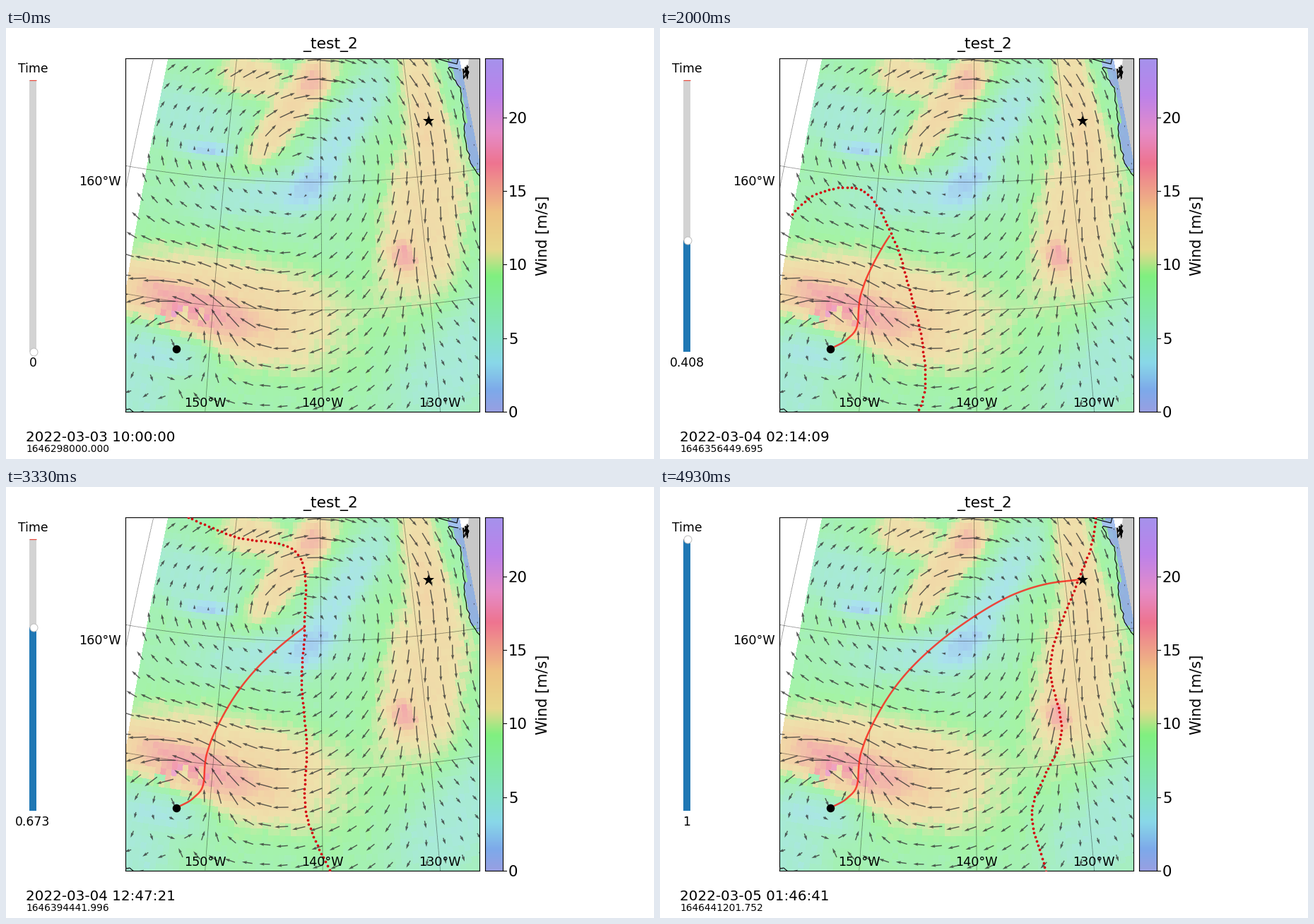
A matplotlib script that plays this animation: 917 px wide and 611 px high, repeating every 5.06 s.

```python
import numpy as np
import matplotlib.pyplot as plt
from matplotlib.animation import FuncAnimation
from matplotlib.colors import LinearSegmentedColormap

W, H, DPI = 917, 611, 64
PT = 72 / DPI  # points per pixel
LOOP_MS, TICK_MS, STEPS = 5060, 20, 49
plt.rcParams["font.family"] = "DejaVu Sans"
rng = np.random.default_rng(4)

MAP = (169, 43, 670, 544)
BAR = (678, 43, 703, 544)
V_MAX = 24
PALETTE = [(0, "#989fe2"), (1.4, "#7da9ea"), (3.3, "#89d8e8"), (5, "#86e2ca"),
           (9.2, "#80f080"), (11, "#e8d88c"), (13.5, "#eec383"), (16.9, "#ee7490"),
           (19, "#e58cc8"), (21.5, "#bc82ea"), (24, "#a592ec")]
CMAP = LinearSegmentedColormap.from_list("wind", [(v / V_MAX, c) for v, c in PALETTE], 512)
WEST_EDGE, EAST_EDGE, SOUTH_EDGE = -158, -123.5, 21

# Patches of stronger or weaker wind: x, y, tilt, half length, half width, change.
BASE_SPEED = 8
PATCHES = [
    (315, 398, 12, 175, 80, 4.6),     # trade wind belt
    (255, 392, 20, 115, 30, 3.6),     # its core
    (222, 452, 18, 70, 30, -4.5),     # lee of the low
    (590, 275, 98, 125, 66, 4.2),     # eastern stream
    (588, 95, 76, 95, 30, 4.0),
    (562, 324, 60, 24, 17, 4.0),
    (403, 118, -50, 102, 26, 4.6),    # northern tongue
    (432, 68, 0, 22, 28, 3.0),
    (348, 68, 15, 48, 32, 4.0),
    (375, 235, -6, 110, 32, -3.2),    # calm crescent
    (472, 158, -58, 120, 27, -4.0),
    (262, 128, 25, 70, 42, -2.8),
    (285, 173, 5, 38, 10, -4.0),
    (180, 515, 0, 55, 55, -2.8),
    (640, 475, -50, 115, 62, -3.0),
]
HIGH, LOW = (410, 215), (245, 432)

COAST = [(640, 58), (626, 55), (643, 88), (648, 130), (650, 162), (658, 192), (672, 212)]
ISLAND = [(609, 43), (622, 47), (638, 51), (640, 43)]
START, GOAL = (241, 455), (598, 132)

# Step, x, y along the best route.
ROUTE = np.array([(0, *START), (3, 265, 441), (6, 280, 417), (7, 281, 400), (11, 288, 366),
                  (15, 302, 334), (25, 355, 257), (33, 422, 199), (41, 506, 150),
                  (45, 549, 137), (49, 597, 131)], float)

# Guide points of the boat's reach at a few steps; the fourth lies on the route.
RING_CENTRE, RING_RADII, RING_TIP = (251, 448), (65, 73), -55
RING_ANGLES = np.radians(RING_TIP + np.append(np.linspace(-180, 0, 4), np.linspace(45, 180, 4)))
REACH = {
    0: [START] * 8,
    7: np.column_stack([np.cos(RING_ANGLES), np.sin(RING_ANGLES)]) * RING_RADII + RING_CENTRE,
    15: [(130, 440), (183, 317), (235, 279), (303, 335), (330, 393), (358, 480), (345, 530), (260, 640)],
    25: [(200, 136), (265, 150), (328, 177), (355, 257), (372, 335), (386, 430), (405, 485), (420, 560)],
    33: [(240, 35), (320, 69), (410, 92), (422, 199), (418, 270), (425, 365), (425, 465), (466, 560)],
    41: [(470, -130), (500, -40), (521, 75), (506, 150), (482, 265), (484, 345), (468, 460), (495, 522)],
    49: [(570, -100), (610, -20), (612, 75), (592, 131), (552, 255), (568, 345), (526, 465), (546, 545)],
}


def axis_x(y):
    return 444.4 + 0.0075 * (y - 43)


def spread(y):
    """Pixels per ten degrees of longitude."""
    d = y - 43
    return 117.8 + 0.118 * d - 4.18e-5 * d ** 2


def bend(x):
    return 0.00033 * (x - 434) ** 2


def project(lon, lat):
    x = 446 + 14 * (lon + 140)
    for _ in range(10):
        y = 218.4 + 18.15 * (40 - lat) - bend(x)
        x = axis_x(y) + (lon + 140) / 10 * spread(y)
    return x, y


def unproject(x, y):
    return (-140 + 10 * (x - axis_x(y)) / spread(y),
            40 + (218.4 - bend(x) - y) / 18.15)


def smooth(knots, points, at):
    """Cubic curve through the points."""
    points = np.asarray(points, float)
    slopes = np.gradient(points, knots, axis=0)
    i = np.clip(np.searchsorted(knots, at, "right") - 1, 0, len(knots) - 2)
    h = (knots[i + 1] - knots[i])[:, None]
    s = (at - knots[i])[:, None] / h
    return ((1 + 2 * s) * (1 - s) ** 2 * points[i] + s ** 2 * (3 - 2 * s) * points[i + 1]
            + h * s * (1 - s) * ((1 - s) * slopes[i] - s * slopes[i + 1]))


def run_length(points):
    return np.append(0, np.cumsum(np.hypot(*np.diff(points, axis=0).T)))


def resample(points, count):
    run = run_length(points)
    at = np.linspace(0, run[-1], count)
    return np.column_stack([np.interp(at, run, c) for c in points.T])


def turned(dx, dy, degrees):
    c, s = np.cos(np.radians(degrees)), np.sin(np.radians(degrees))
    return dx * c + dy * s, dy * c - dx * s


shore = resample(np.array(COAST, float), 45)
shore += rng.normal(0, 0.7, shore.shape)


def wind_speed(x, y):
    speed = np.full(x.shape, float(BASE_SPEED))
    for px, py, tilt, length, width, change in PATCHES:
        along, across = turned(x - px, y - py, tilt)
        speed += change * np.exp(-abs(along / length) ** 3 - abs(across / width) ** 3)
    coast_x = np.interp(y, *np.array(COAST[1:]).T[::-1])
    return np.where(x > coast_x + 2, 1.4, np.clip(speed, 1.5, 17))


def wind_vector(x, y):
    """Unit wind: a tilted high, a small low and an outflow in the east."""
    dx, dy = x - HIGH[0], y - HIGH[1]
    q, p = turned(dx, dy, 30)
    u = 0.866 * -p - 0.5 * 1.5 * q
    v = 0.5 * -p + 0.866 * 1.5 * q
    u -= 2 * np.clip(-dx / 150, 0, 1) * (dy + 80)
    size = np.hypot(u, v) + 1e-9
    u, v = u / size, v / size

    dx, dy = x - LOW[0], y - LOW[1]
    dist = np.hypot(dx, dy) + 1e-9
    swirl = 3 * np.exp(-(dist / 85) ** 2) / dist
    push = 2 * np.exp(-((x - 670) / 100) ** 2 - ((y - 420) / 135) ** 2)
    u, v = u + swirl * dy + push, v - swirl * dx + 0.3 * push
    size = np.hypot(u, v)
    return u / size, v / size


def wind_image():
    """Half-degree cells coloured by wind speed, sampled per pixel."""
    x, y = project(*np.meshgrid(np.arange(WEST_EDGE, EAST_EDGE + 0.1, 0.5),
                                np.arange(SOUTH_EDGE, 50.6, 0.5)))
    rough = 0.25 + 3 * np.exp(-((x - 245) / 40) ** 2 - ((y - 408) / 13) ** 2)
    cells = np.clip(wind_speed(x, y) + rough * rng.normal(size=x.shape), 0.5, 22)
    lon, lat = unproject(*np.meshgrid(np.arange(MAP[0], MAP[2]) + 0.5,
                                      np.arange(MAP[1], MAP[3]) + 0.5))
    col = np.rint((lon - WEST_EDGE) * 2).astype(int)
    row = np.clip(np.rint((lat - SOUTH_EDGE) * 2).astype(int), 0, cells.shape[0] - 1)
    inside = (col >= 0) & (col < cells.shape[1])
    rgba = CMAP(cells[row, np.where(inside, col, 0)] / V_MAX)
    rgba[..., 3] = 0.72 * inside
    return rgba


def front(step):
    """Evenly spaced dots along the reach, kept to where wind is known."""
    keys = list(REACH)
    k = min(np.searchsorted(keys, step, "right") - 1, len(keys) - 2)
    w = (step - keys[k]) / (keys[k + 1] - keys[k])
    guide = (1 - w) * np.array(REACH[keys[k]]) + w * np.array(REACH[keys[k + 1]])
    run = run_length(guide)
    curve = smooth(run, guide, np.linspace(0, run[-1], 250))
    points = resample(curve, int(run_length(curve)[-1] / 6.4) + 1)
    return points[unproject(*points.T)[0] > WEST_EDGE - 0.3]


fig = plt.figure(figsize=(W / DPI, H / DPI), dpi=DPI, facecolor="white")


def panel(left, top, right, bottom):
    """Axes over a part of the stage, measured in stage pixels."""
    ax = fig.add_axes([left / W, 1 - bottom / H, (right - left) / W, (bottom - top) / H])
    ax.set(xlim=(left, right), ylim=(bottom, top), xticks=[], yticks=[])
    for spine in ax.spines.values():
        spine.set_linewidth(1.1 * PT)
    return ax


def label(ax, x, y, text, size, ha="center", **kw):
    return ax.text(x, y, text, fontsize=size * PT, ha=ha, va="center_baseline", **kw)


stage = panel(0, 0, W, H)
stage.axis("off")
sea = panel(*MAP)
bar = panel(*BAR)

# Map
land = [*shore, (672, 43), (655, 43), (654, 52), (648, 57)]
for ground in (land, ISLAND):
    sea.fill(*zip(*ground), color="#c8c8c8", lw=0, zorder=0)
sea.imshow(wind_image(), extent=(MAP[0], MAP[2], MAP[3], MAP[1]), aspect="auto",
           interpolation="nearest", zorder=1)
inlets = rng.normal((652, 62), (2.2, 5), (30, 2))
for line in (shore, ISLAND, inlets, [(169, 541), (175, 540), (181, 545)]):
    sea.plot(*zip(*line), color="black", lw=1.1 * PT, zorder=2)

tail_x, tail_y = project(*np.meshgrid(np.arange(WEST_EDGE, EAST_EDGE + 0.1, 1.5),
                                      np.arange(SOUTH_EDGE, 50, 1.5)))
reach = 1.85 * wind_speed(tail_x, tail_y)
u, v = wind_vector(tail_x, tail_y)
sea.quiver(tail_x, tail_y, reach * u, reach * v, angles="xy", scale_units="xy", scale=1,
           units="dots", width=1.4, color="#303030", alpha=0.78, zorder=3)

grid_style = dict(color="black", lw=0.8 * PT, ls=(0, (1, 1.4)), zorder=4)
for meridian in range(-160, -120, 10):
    sea.plot(*project(np.full(60, float(meridian)), np.linspace(20, 52, 60)), **grid_style)
for parallel in (30, 40):
    sea.plot(*project(np.linspace(-165, -120, 60), np.full(60, float(parallel))), **grid_style)

route, = sea.plot([], [], color="#f8281e", alpha=0.85, lw=2.5 * PT, zorder=5)
dots, = sea.plot([], [], "o", color="#d2000f", ms=3.7 * PT, mew=0, zorder=6)
sea.plot(*START, "o", color="black", ms=11.5 * PT, mew=0, zorder=7)
sea.plot(*GOAL, "*", color="black", ms=17 * PT, mew=0, zorder=7)
for k, degrees in enumerate((150, 140, 130)):
    label(sea, 282 + 166 * k, 530, f"{degrees}°W", 17.6, zorder=8)
label(stage, 162.5, 216, "160°W", 17.6, ha="right")

# Colour bar
bar.imshow(np.linspace(1, 0, 501)[:, None], cmap=CMAP, vmin=0, vmax=1, aspect="auto",
           extent=(BAR[0], BAR[2], BAR[3], BAR[1]))
for value in range(0, 21, 5):
    y = BAR[3] - value * 20.86
    stage.plot([703.5, 708], [y, y], color="black", lw=1.1 * PT)
    label(stage, 711, y, str(value), 21.2, ha="left")
stage.text(760, 294, "Wind [m/s]", fontsize=20.9 * PT, rotation=90, ha="center", va="center")

# Slider and captions
label(stage, 459, 21, "_test_2", 21.9)
label(stage, 38, 56, "Time", 17.2)
TOP, BOTTOM = 73.5, 458.5
stage.fill([33, 43, 43, 33], [TOP, TOP, BOTTOM, BOTTOM], color="#d3d3d3", lw=0)
filled = stage.bar(38, 0, 10, bottom=BOTTOM, color="#1f77b4", lw=0)[0]
stage.plot([33, 43], [TOP, TOP], color="#e8493c", lw=1.2 * PT, solid_capstyle="butt")
knob, = stage.plot([38.5], [BOTTOM], "o", ms=11 * PT, mfc="white", mec="#bfbfbf",
                   mew=1 * PT, zorder=5)
fraction = label(stage, 38, 473, "", 17.2)
clock = label(stage, 28, 579, "", 19.9, ha="left")
epoch = label(stage, 28, 595.5, "", 13.7, ha="left")
stage.set(xlim=(0, W), ylim=(H, 0))


def step_at(ms):
    """Even steps begin on the hundred, odd ones 30 ms after it."""
    n = int(ms // 100)
    return min(n - (n % 2 and ms % 100 < 30), STEPS)


def draw(frame):
    step = step_at(frame * TICK_MS + TICK_MS / 2)
    share = step / STEPS
    route.set_data(*smooth(ROUTE[:, 0], ROUTE[:, 1:], np.linspace(0, step, 120)).T)
    dots.set_data(*(front(step).T if step else ([], [])))
    route.set_visible(step > 0)

    filled.set_height(-(BOTTOM - TOP) * share)
    knob.set_ydata([BOTTOM - (BOTTOM - TOP) * share])
    fraction.set_text(f"{share:.3g}")

    elapsed = 143201.752 * share
    day, rest = divmod(36000 + int(elapsed), 86400)
    clock.set_text(f"2022-03-{3 + day:02d} {rest // 3600:02d}:{rest // 60 % 60:02d}:{rest % 60:02d}")
    epoch.set_text(f"{1646298000 + elapsed:.3f}")
    return route, dots, filled, knob, fraction, clock, epoch


anim = FuncAnimation(fig, draw, frames=LOOP_MS // TICK_MS, interval=TICK_MS,
                     repeat=True, repeat_delay=0)
plt.show()
```
